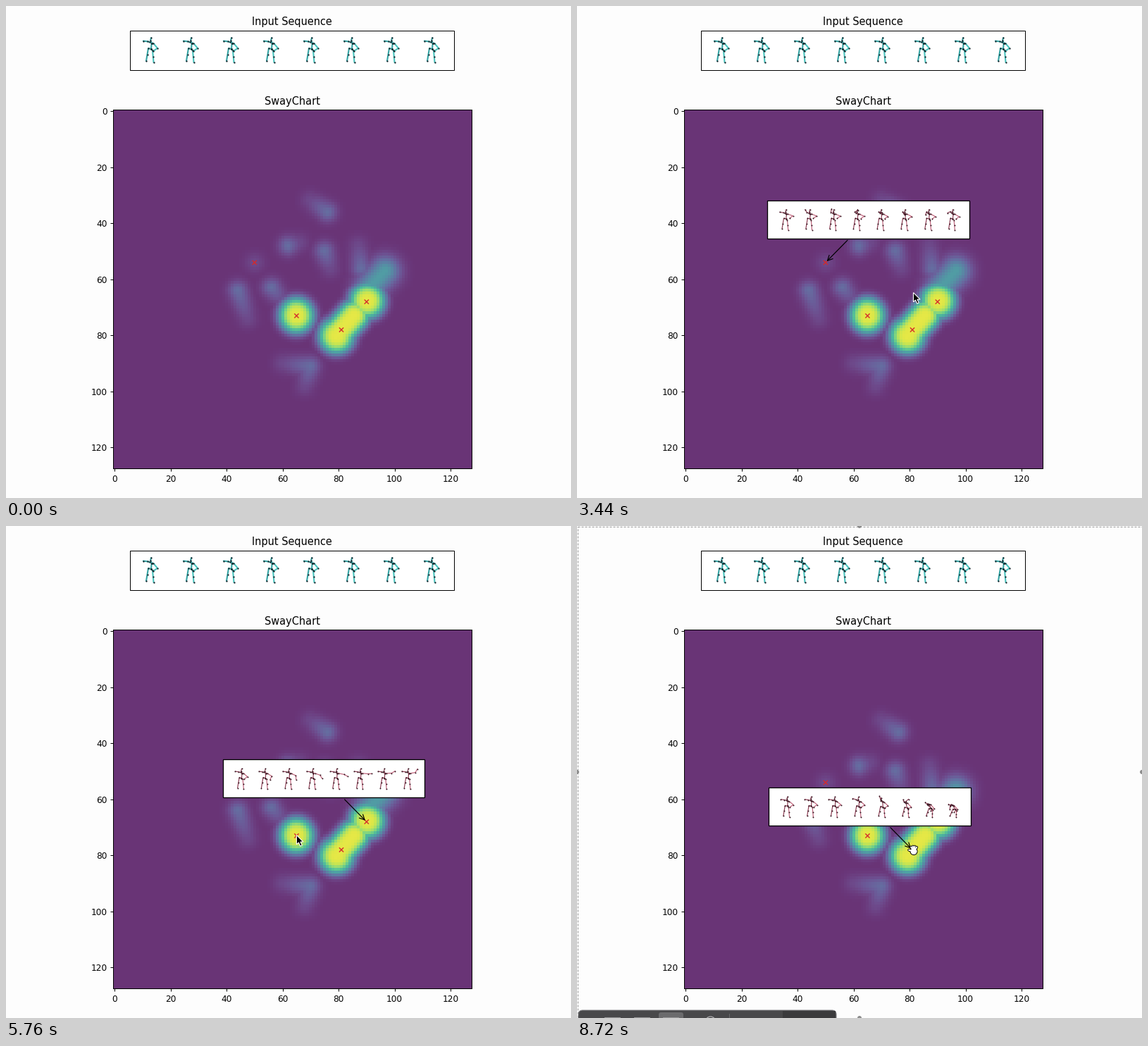
Write a matplotlib script that moves like this. It is 802x698 px and loops after 8.8 s.

```python
import numpy as np
import matplotlib.pyplot as plt
from matplotlib.animation import FuncAnimation
from matplotlib.collections import LineCollection
from matplotlib.patches import Circle, FancyArrowPatch, FancyBboxPatch, Polygon, Rectangle

W, H, DPI = 802, 698, 64
PX = 72 / DPI                       # points per pixel
STEP, FRAMES = 80, 110
SPOTS = [(50, 54), (90, 68), (65, 73), (81, 78)]

plt.rcParams["font.family"] = "DejaVu Sans"
fig = plt.figure(figsize=(W / DPI, H / DPI), dpi=DPI, facecolor="#fdfdfd")

# ---- heat map -------------------------------------------------------------
X0, Y0, SIDE, CELLS = 152, 147.3, 508.9, 128
gx, gy = np.meshgrid(np.arange(CELLS), np.arange(CELLS))


def glow(start, end, radius, amp, power=2.0, fade=1.0):
    """A soft stroke whose strength grows from fade * amp to amp."""
    (x, y), (dx, dy) = start, np.subtract(end, start)
    k = np.clip(((gx - x) * dx + (gy - y) * dy) / max(dx * dx + dy * dy, 1e-9), 0, 1)
    d = np.hypot(gx - x - k * dx, gy - y - k * dy)
    return amp * (fade + (1 - fade) * k) * np.exp(-(d / radius) ** power)


WISPS = [
    ((70, 32), (76, 36)), ((50, 54), (50, 54)), ((66, 47), (62, 48)),
    ((77, 56), (75, 50)), ((47.5, 74), (44, 64)), ((60, 68), (56, 63)),
    ((60, 90), (70, 91)), ((68, 98), (70, 91)), ((87, 48), (88, 56)),
]
layers = [glow(a, b, 3.4, 0.22, fade=0.35) for a, b in WISPS]
layers.append(glow((91, 63), (96.5, 57), 5, 0.45))
layers += [glow(p, p, 6.5, 0.95, 3.6) for p in [(65, 73), (90.2, 67.8), (79.3, 80.2)]]
layers.append(glow((80, 79), (85.5, 73), 5.6, 0.95, 3.6))

ax = fig.add_axes([X0 / W, 1 - (Y0 + SIDE) / H, SIDE / W, SIDE / H])
ax.imshow(np.max(layers, axis=0), cmap="viridis", vmin=0, vmax=1, alpha=0.8,
          interpolation="nearest", aspect="auto")
ax.set_xticks(range(0, CELLS, 20))
ax.set_yticks(range(0, CELLS, 20))
ax.tick_params(length=4.2 * PX, width=PX, pad=4.2 * PX, labelsize=12.1 * PX)
for spine in ax.spines.values():
    spine.set_linewidth(PX)

# ---- overlay in pixel coordinates -----------------------------------------
stage = fig.add_axes([0, 0, 1, 1])
stage.set(xlim=(0, W), ylim=(H, 0))
stage.axis("off")


def title(y, s):
    stage.text(406, y, s, ha="center", va="baseline", size=14.54 * PX)


def box(x0, y0, x1, y1, z, lw=1.0):
    return stage.add_patch(Rectangle((x0, y0), x1 - x0, y1 - y0, fc="white",
                                     ec="black", lw=lw * PX, zorder=z))


def to_px(cell):
    return np.array([X0, Y0]) + (np.array(cell) + 0.5) * SIDE / CELLS


title(26.8, "Input Sequence")
title(139.6, "SwayChart")
box(176, 35, 636, 91, 1)
for spot in SPOTS:
    x, y = to_px(spot)
    for s in (-1, 1):
        stage.plot([x - 2.6, x + 2.6], [y - 2.6 * s, y + 2.6 * s],
                   color="#d62a2c", lw=1.4 * PX, zorder=3)

# ---- stick figures --------------------------------------------------------
# A pose holds angles in degrees (0 right, 90 down) and how far the hip sinks.
BASE = dict(spine=-85, neck=-115, elbow_l=-165, hand_l=-172,
            elbow_r=50, hand_r=146, sink=0)


def chain(start, *links):
    """Joint positions along (length, angle) links."""
    points = [np.array(start, float)]
    for length, angle in links:
        a = np.radians(angle)
        points.append(points[-1] + length * np.array([np.cos(a), np.sin(a)]))
    return points


def leg(hip, foot):
    return [hip, (hip + foot) / 2, foot]


def skeleton(p):
    """Polylines as (joints, is_right_side)."""
    hip = np.array([2 + p["sink"] / 3, p["sink"] - 1])
    body = chain(hip, (8.5, p["spine"]), (4, p["neck"]), (4, p["neck"] + 40))
    chest = body[1]
    left_hip, right_hip = hip + (-4, -1), hip + (2, 2)
    return [
        (body, False),
        ([hip] + leg(left_hip, np.array([-5, 16])), False),
        ([hip] + leg(right_hip, np.array([5.5, 18])), True),
        (chain(chest, (3.3, -155), (3, p["elbow_l"]), (6, p["hand_l"])), False),
        (chain(chest, (2.5, 10), (9, p["elbow_r"]), (7, p["hand_r"])), True),
    ]


def person(pose, cx, cy, scale, tones, dot, lw, z):
    parts = [([(cx, cy) + scale * q for q in joints], right)
             for joints, right in skeleton(pose)]
    limbs = LineCollection([j for j, _ in parts], colors=[tones[r] for _, r in parts],
                           lw=lw * PX, zorder=z, capstyle="round")
    stage.add_collection(limbs)
    xs, ys = np.concatenate([j for j, _ in parts]).T
    joints = stage.scatter(xs, ys, s=(2.3 * scale * PX) ** 2, c=dot, lw=0, zorder=z + 0.1)
    return [limbs, joints]


for i in range(8):
    person(BASE, 204 + 57 * i, 62, 1, ("#35a3a3", "#4cc4bf"), "#16262c", 2.1, 2)


# ---- popups ---------------------------------------------------------------
def popup(spot, side, start, end, late=False):
    x, y = to_px(spot)
    cx, cy = x + side * 60.7, y - 61.2
    arrow = FancyArrowPatch((cx - side * 29.5, cy + 29.5), (x + side * 1.8, y - 1.8),
                            arrowstyle="->", mutation_scale=18 * PX, shrinkA=0,
                            shrinkB=0, lw=1.2 * PX, color="black", zorder=5)
    parts = [box(cx - 143.3, cy - 27, cx + 143.3, cy + 27, 5, 1.3),
             stage.add_patch(arrow)]
    first, last = BASE | start, BASE | end
    for i in range(8):
        t = np.clip((i - 2.5) / 4, 0, 1) ** 1.5 if late else i / 7
        pose = {k: first[k] + (last[k] - first[k]) * t for k in BASE}
        parts += person(pose, cx + 33.8 * (i - 3.5), cy, 0.83,
                        ("#8f3f56", "#c0647c"), "#33161f", 1.2, 6)
    return parts


SPREAD = dict(elbow_l=140, hand_l=-150, elbow_r=30)
popups = [
    popup(SPOTS[0], 1, dict(elbow_r=20), dict(elbow_l=-120, hand_l=155, elbow_r=30)),
    popup(SPOTS[1], -1, dict(elbow_r=40), dict(elbow_r=-10, hand_r=-60)),
    popup(SPOTS[2], -1, SPREAD, SPREAD | dict(elbow_r=20, hand_r=170)),
    popup(SPOTS[3], -1, dict(elbow_r=40),
          dict(spine=-120, neck=-185, elbow_l=120, hand_l=95, elbow_r=50, sink=6), late=True),
]

# ---- pointers -------------------------------------------------------------
ARROW = np.array([(0, 0), (0, 13.2), (3, 10.5), (5.3, 15.6), (7.8, 14.5),
                  (5.5, 9.6), (9.6, 9.6)])
cursor = stage.add_patch(Polygon(ARROW, fc="black", ec="white", lw=1.1 * PX, zorder=10))

ENTRY = np.array([420, 425])
MOVES = [(1040, 1440), (2880, 3680), (4880, 5600), (6080, 6640)]
CLICK_DELAY = 320
CAPTURE = 8400


def pointer(ms):
    """Ease from spot to spot, resting between moves."""
    tip = ENTRY
    for spot, (leave, arrive) in zip(SPOTS, MOVES):
        k = np.clip((ms - leave) / (arrive - leave), 0, 1)
        tip = tip + (to_px(spot) + (0, -1) - tip) * k * k * (3 - 2 * k)
    return tip


# ---- capture frame, toolbar and open hand ---------------------------------
capture = []


def extra(patch, z):
    patch.set_zorder(z)
    capture.append(stage.add_patch(patch))


def rounded(x, y, w, h, r, z, **style):
    shape = f"round,pad=0,rounding_size={r}"
    extra(FancyBboxPatch((x, y), w, h, boxstyle=shape, **style), z)


extra(Rectangle((0.5, 0.5), W - 1, H - 1, fill=False, ec="#9a9a9a", lw=PX,
                ls=(0, (3, 2))), 11)
for spot in [(W / 2, 0), (W / 2, H), (0, H / 2), (W, H / 2)]:
    extra(Circle(spot, 3, fc="#8c8c8c", lw=0), 12)
rounded(2, 687, 366, 50, 6, 12, fc="#48484a", ec="#77777a", lw=PX)
extra(Rectangle((292, 688), 75, 12, fc="#3a3a3c", lw=0), 13)
extra(Rectangle((216, 692), 1, 8, fc="#68686a", lw=0), 13)
rounded(116, 690, 35, 26, 3, 13, fc="#6b6b6d", lw=0)
for i in range(3):
    extra(Rectangle((39 + 41.5 * i, 696.5), 22, 6, fill=False, ec="#99999b", lw=PX), 14)
extra(Circle((189.5, 703), 7, fill=False, ec="#b4b4b6", lw=1.2 * PX), 14)

PALM = (478, 461.5)
extra(Circle(PALM, 5, fc="white", ec="black", lw=1.1 * PX), 15)
for angle in (-165, -122, -100, -78, -54):
    finger = np.transpose(chain(PALM, (7, angle)))
    for color, width, z in (("black", 4, 15), ("white", 2.2, 16)):
        capture += stage.plot(*finger, color=color, lw=width * PX, zorder=z,
                              solid_capstyle="round")
extra(Circle(PALM, 4.4, fc="white", lw=0), 16)


def draw(n):
    ms = n * STEP
    shown = sum(ms >= arrive + CLICK_DELAY for _, arrive in MOVES) - 1
    for i, parts in enumerate(popups):
        for part in parts:
            part.set_visible(i == shown)
    cursor.set_xy(ARROW + pointer(ms))
    cursor.set_visible(MOVES[0][0] <= ms < CAPTURE)
    for part in capture:
        part.set_visible(ms >= CAPTURE)
    return []


anim = FuncAnimation(fig, draw, frames=FRAMES, interval=STEP, repeat=True,
                     repeat_delay=0, init_func=lambda: draw(0), blit=False)
plt.show()
```
